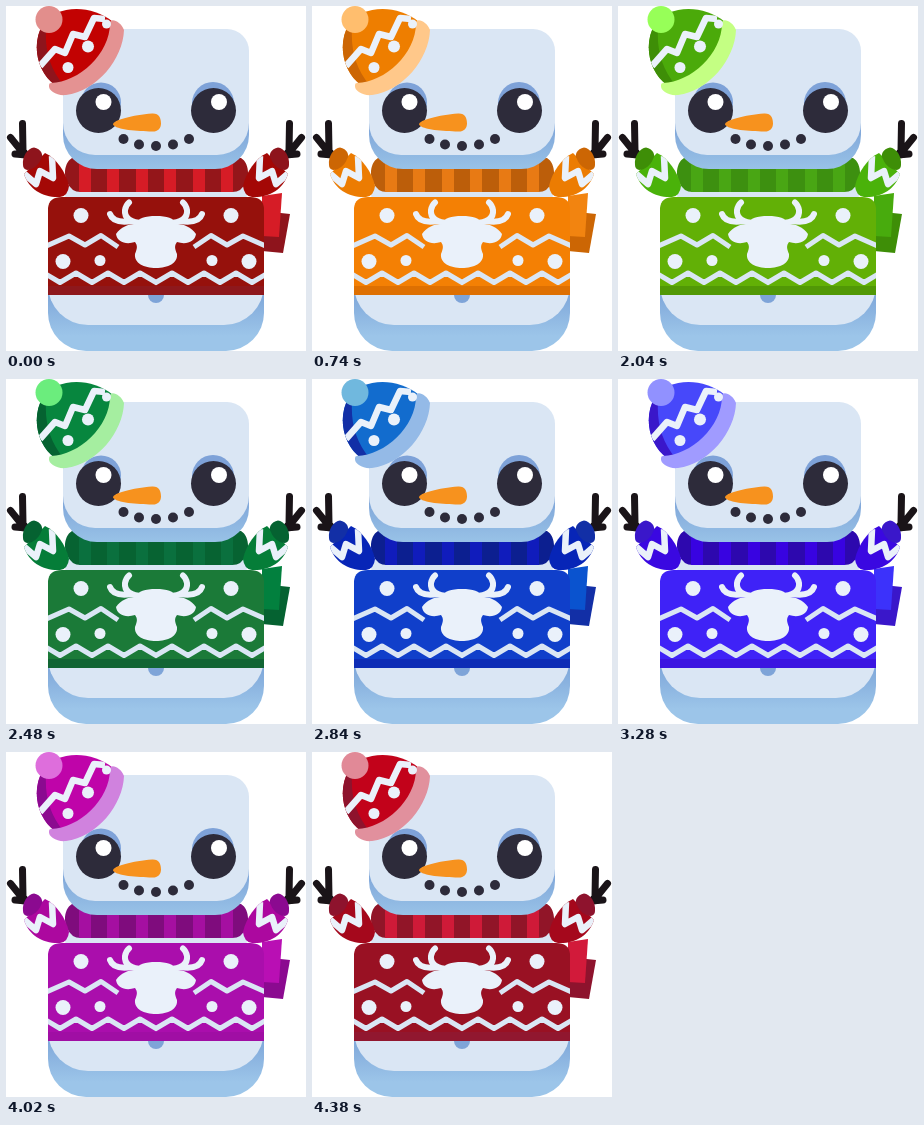
An HTML page that plays this animation: 300x345 px, repeating every 4440 ms.

```html
<!DOCTYPE html>
<html lang="en">
<head>
<meta charset="utf-8">
<title>Snowman</title>
<style>
@property --knit { syntax: "<color>"; inherits: true; initial-value: #96110c; }
@property --hem { syntax: "<color>"; inherits: true; initial-value: #8e181c; }
@property --sleeve { syntax: "<color>"; inherits: true; initial-value: #a40806; }
@property --hat { syntax: "<color>"; inherits: true; initial-value: #c00404; }
@property --pom { syntax: "<color>"; inherits: true; initial-value: #e28e8c; }
@property --brim { syntax: "<color>"; inherits: true; initial-value: #e49292; }
@property --scarf { syntax: "<color>"; inherits: true; initial-value: #d61c26; }
@property --fold { syntax: "<color>"; inherits: true; initial-value: #94161a; }
@property --tail { syntax: "<color>"; inherits: true; initial-value: #d61c26; }
@property --cuff { syntax: "<color>"; inherits: true; initial-value: #8e141c; }

html, body { margin: 0; width: 100%; height: 100%; overflow: hidden; background: #fff; }
svg {
  display: block; width: 300px; height: 345px;
  --snow: #dae6f4; --frost: #eaf1fa; --ink: #2d2b3a;
  /* each colour holds, then blends to the next in ten 60 ms steps */
  animation: dye 4440ms steps(10) -2ms infinite;
}
@keyframes dye {
  0%, 3.1532%, 100% {
    --knit: rgb(150 17 12); --hem: rgb(142 24 28); --sleeve: rgb(164 8 6);
    --hat: rgb(194 2 2); --pom: rgb(226 142 140); --brim: rgb(228 146 146);
    --scarf: rgb(214 28 38); --fold: rgb(148 22 26);
    --tail: rgb(214 28 38); --cuff: rgb(142 20 28);
  }
  16.6667%, 19.8198% {
    --knit: rgb(244 128 4); --hem: rgb(222 112 2); --sleeve: rgb(236 124 2);
    --hat: rgb(238 126 0); --pom: rgb(255 190 110); --brim: rgb(255 200 138);
    --scarf: rgb(232 122 20); --fold: rgb(188 94 10);
    --tail: rgb(242 132 16); --cuff: rgb(204 102 4);
  }
  33.3333%, 36.4865% {
    --knit: rgb(255 255 0); --hem: rgb(228 228 0); --sleeve: rgb(238 234 0);
    --hat: rgb(240 236 0); --pom: rgb(255 255 80); --brim: rgb(255 255 120);
    --scarf: rgb(225 225 20); --fold: rgb(190 195 10);
    --tail: rgb(240 236 10); --cuff: rgb(205 205 0);
  }
  50%, 53.1532% {
    --knit: rgb(30 142 8); --hem: rgb(18 120 8); --sleeve: rgb(4 154 14);
    --hat: rgb(4 142 14); --pom: rgb(106 255 92); --brim: rgb(170 255 136);
    --scarf: rgb(8 140 20); --fold: rgb(5 122 18);
    --tail: rgb(0 143 14); --cuff: rgb(0 115 10);
  }
  66.6667%, 69.8198% {
    --knit: rgb(13 43 250); --hem: rgb(13 26 226); --sleeve: rgb(8 8 225);
    --hat: rgb(21 100 254); --pom: rgb(113 166 255); --brim: rgb(143 169 255);
    --scarf: rgb(18 0 230); --fold: rgb(14 8 176);
    --tail: rgb(12 68 255); --cuff: rgb(23 30 205);
  }
  83.3333%, 86.4865% {
    --knit: rgb(178 12 240); --hem: rgb(168 10 222); --sleeve: rgb(176 8 225);
    --hat: rgb(189 5 240); --pom: rgb(220 96 254); --brim: rgb(200 123 255);
    --scarf: rgb(144 10 213); --fold: rgb(118 7 168);
    --tail: rgb(173 9 241); --cuff: rgb(138 6 194);
  }
}
.snow { fill: var(--snow); }
.frost { fill: var(--frost); }
.ink { fill: var(--ink); }
.knit { fill: var(--knit); }
.hem { fill: var(--hem); }
.sleeve { fill: var(--sleeve); }
.hat { fill: var(--hat); }
.pom { fill: var(--pom); }
.brim { fill: var(--brim); }
.scarf { fill: var(--scarf); }
.fold { fill: var(--fold); }
.tail { fill: var(--tail); }
.cuff { fill: var(--cuff); }
.line { fill: none; stroke: var(--snow); stroke-width: 5; stroke-linejoin: round; }
.bold { stroke: var(--frost); stroke-width: 6.5; }
.twig { fill: none; stroke: #1a1418; stroke-width: 7; stroke-linecap: round; stroke-linejoin: round; }
.horn { fill: none; stroke: var(--frost); stroke-width: 6; stroke-linecap: round; }
</style>
</head>
<body>
<svg viewBox="0 0 300 345">
  <defs>
    <linearGradient id="chin" gradientUnits="userSpaceOnUse" x1="0" y1="118" x2="0" y2="163">
      <stop stop-color="#7ea4d8"/><stop offset="1" stop-color="#98c2e7"/>
    </linearGradient>
    <linearGradient id="belly" gradientUnits="userSpaceOnUse" x1="0" y1="289" x2="0" y2="330">
      <stop stop-color="#80a8da"/><stop offset="1" stop-color="#9cc5e9"/>
    </linearGradient>
    <clipPath id="neck"><path d="M66 152H235C242 156 244 168 240 176Q236 186 226 186H75Q65 186 61 176C57 168 59 156 66 152Z"/></clipPath>
    <clipPath id="dome"><path id="domeShape" d="M49 79C31 66 25 38 37 18C49 0 84 -3 107 16C111 42 84 76 49 79Z"/></clipPath>
    <clipPath id="sleeve"><path id="sleeveShape" d="M18 168L39 147C50 152 60 166 63 180Q62 190 54 191C38 192 23 184 18 168Z"/></clipPath>
    <clipPath id="jumper"><path id="jumperShape" d="M42 202Q43 191 56 191H244Q257 191 258 202V289H42Z"/></clipPath>
  </defs>

  <!-- scarf end -->
  <path class="cuff" d="M256 205L284 208L277 247L256 245Z"/>
  <path class="tail" d="M256 190L276 187L273 231L256 230Z"/>

  <!-- body -->
  <path fill="url(#belly)" d="M42 270H258V307A38 38 0 0 1 220 345H80A38 38 0 0 1 42 307Z"/>
  <path class="snow" d="M42 270H258V279A40 40 0 0 1 218 319H82A40 40 0 0 1 42 279Z"/>
  <circle cx="150" cy="289" r="8" fill="#7ea4d8"/>
  <rect class="snow" x="59" y="165" width="182" height="35" rx="12"/>

  <!-- jumper -->
  <use href="#jumperShape" class="knit"/>
  <path class="hem" d="M42 280H258V289H42Z"/>
  <g clip-path="url(#jumper)">
    <g id="knitSide">
      <path class="line" d="M38 241L63 230L79 239L95 229.500L112 241"/>
      <path class="line" d="M38 267L54 276.500L70 267L86 276.500L102 267L118 276.500L134 267L151 277"/>
      <g class="frost">
        <circle cx="75" cy="209.500" r="7.500"/>
        <circle cx="57" cy="255.500" r="7.500"/>
        <circle cx="94" cy="254.500" r="5.500"/>
      </g>
      <path class="horn" d="M137 217C125 217 118 212 119 204Q120 199 123 196.500M126 215C113 217 106 214 104 208"/>
    </g>
    <use href="#knitSide" transform="matrix(-1 0 0 1 300 0)"/>
  </g>
  <path class="frost" d="M150 210C161 210 168 212 170 218C178 218 185 221 190 228C189 236 180 239 171 236C168 240 169 243 171 248C172 257 162 262 150 262S128 257 129 248C131 243 132 240 129 236C120 239 111 236 110 228C115 221 122 218 130 218C132 212 139 210 150 210Z"/>

  <!-- scarf -->
  <g clip-path="url(#neck)">
    <path class="fold" d="M55 140H246V190H55Z"/>
    <path id="stripes" class="scarf" d="M73 140h12v50h-12zM101 140h12v50h-12zM130 140h12v50h-12z"/>
    <use href="#stripes" transform="matrix(-1 0 0 1 300 0)"/>
  </g>

  <!-- arms -->
  <g id="arm">
    <path class="twig" d="M16.500 117.500L17 145L28 157M4.500 131.500L17 147M9 148L20 149"/>
    <use href="#sleeveShape" class="sleeve"/>
    <g clip-path="url(#sleeve)">
      <path class="line bold" d="M15 165L30 178L34 165L47 172L46 150"/>
    </g>
    <path class="cuff" d="M17 159C16 150 22 142 28 141.500C35 143 38 149 35 153C33 159 27 164 21 164Q17 163 17 159Z"/>
  </g>
  <use href="#arm" transform="matrix(-1 0 0 1 300 0)"/>

  <!-- head -->
  <path fill="url(#chin)" d="M57 60H243V129A34 34 0 0 1 209 163H91A34 34 0 0 1 57 129Z"/>
  <path class="snow" d="M79 23H221A22 22 0 0 1 243 45V117A32 32 0 0 1 211 149H89A32 32 0 0 1 57 117V45A22 22 0 0 1 79 23Z"/>
  <g fill="#7ea2d8">
    <circle cx="95" cy="96.500" r="20"/>
    <circle cx="207" cy="97" r="21"/>
  </g>
  <g class="ink">
    <circle cx="92.500" cy="104.500" r="22.500"/>
    <circle cx="207.500" cy="104.500" r="22.500"/>
    <circle cx="117.500" cy="133" r="5"/>
    <circle cx="133" cy="138.500" r="5"/>
    <circle cx="150" cy="140" r="5"/>
    <circle cx="167" cy="138.500" r="5"/>
    <circle cx="183" cy="133" r="5"/>
  </g>
  <g fill="#fff">
    <circle cx="97.500" cy="96" r="8"/>
    <circle cx="213" cy="96" r="8"/>
  </g>
  <path fill="#f7921e" d="M107 118.500C107 114 127 109 146 107.500C153 107 155 112 155 117.500S151 126 146 125.500C132 125 110 124 107 118.500Z"/>

  <!-- hat -->
  <use href="#domeShape" class="hat"/>
  <g clip-path="url(#dome)">
    <path class="cuff" d="M24 24H40Q38 58 60 82H24Z"/>
    <path class="line bold" d="M34 60L49 43L59 47L67 28L79 31L88 12L99 13"/>
    <g class="frost">
      <circle cx="62" cy="61.500" r="5.500"/>
      <circle cx="82" cy="40.500" r="6"/>
    </g>
  </g>
  <path class="brim" d="M45 77C73 76 104 48 104 17C104 11 115 15 118 24C117 53 91 85 60 89C51 90 42 85 43 79Q43 77 45 77Z"/>
  <circle class="frost" cx="100.500" cy="18" r="4.500"/>
  <circle class="pom" cx="43" cy="13.500" r="13.500"/>
</svg>
</body>
</html>
```
